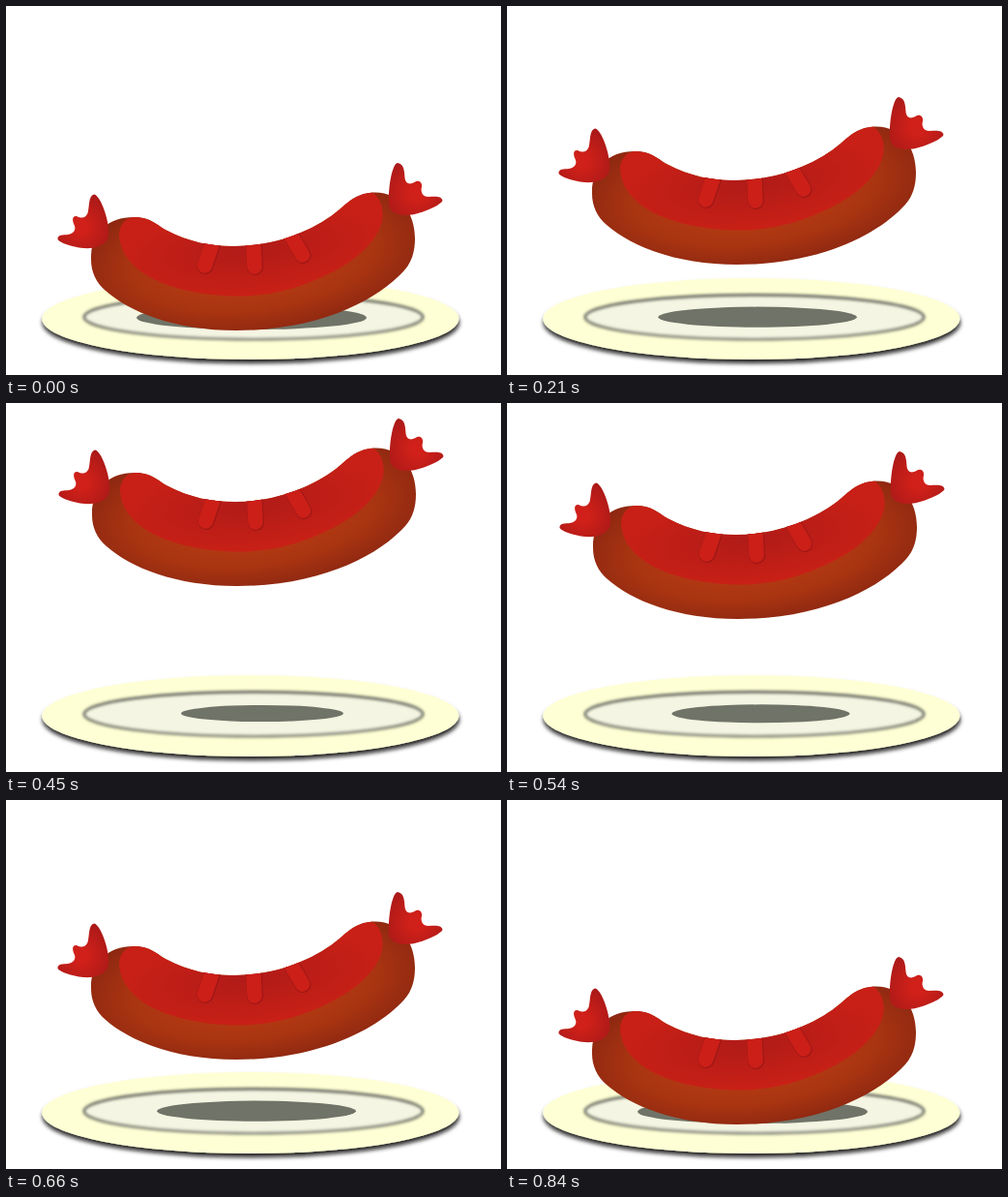
An HTML page that plays this animation: 512 by 381 pixels, repeating every 0.87 s.

```html
<!DOCTYPE html>
<html lang="en">
<head>
<meta charset="utf-8">
<title>Bouncing sausage</title>
<style>
  html, body { margin: 0; width: 100%; height: 100%; overflow: hidden; background: #fff; }
  svg { display: block; }
</style>
</head>
<body>
<svg width="512" height="381" viewBox="0 0 512 381">
  <defs>
    <radialGradient id="skin" gradientUnits="userSpaceOnUse" cx="0" cy="0" r="1"
      gradientTransform="translate(256 258) rotate(-7) scale(182 80)">
      <stop offset=".45" stop-color="#b23a12"/>
      <stop offset=".7" stop-color="#a93411"/>
      <stop offset="1" stop-color="#8e2811"/>
    </radialGradient>
    <radialGradient id="meat" gradientUnits="userSpaceOnUse" cx="0" cy="0" r="1"
      gradientTransform="translate(254 251) rotate(-7) scale(138 46)">
      <stop offset="0" stop-color="#b01b18"/>
      <stop offset="1" stop-color="#c82016"/>
    </radialGradient>
    <radialGradient id="tailL" gradientUnits="userSpaceOnUse" cx="77" cy="228" r="36">
      <stop offset=".2" stop-color="#d02019"/>
      <stop offset="1" stop-color="#a81918"/>
    </radialGradient>
    <radialGradient id="tailR" gradientUnits="userSpaceOnUse" cx="425" cy="193" r="38">
      <stop offset=".2" stop-color="#d02019"/>
      <stop offset="1" stop-color="#a81918"/>
    </radialGradient>
    <linearGradient id="rim" x2="0" y2="1">
      <stop stop-color="#55574b"/>
      <stop offset="1" stop-color="#808273"/>
    </linearGradient>
    <filter id="drop" x="-10%" y="-20%" width="120%" height="150%">
      <feDropShadow dx=".5" dy="4" stdDeviation="1.9" flood-color="#111" flood-opacity=".9"/>
    </filter>
    <filter id="soft" x="-5%" y="-20%" width="110%" height="140%">
      <feGaussianBlur stdDeviation="1.4"/>
    </filter>
    <path id="body" d="M88 262C87 236 104 218 132 218C150 218 156 226 165 231C190 244 212 248 236 248
      C280 248 320 231 345 210C354 202 364 192.5 382 192.5C408 192.5 423 214 423 240C423 253 420 264 412 273
      C385 303 325 335 238 335C175 335 128 316 103 294C93 286 88 274 88 262Z"/>
    <clipPath id="inside"><use href="#body"/></clipPath>
    <path id="marks" d="M215 242L206 268.5M256 240L257.5 269.5M292 232L307 257.5"/>
  </defs>

  <ellipse cx="252.8" cy="323" rx="215.5" ry="42" fill="#ffffd5" filter="url(#drop)"/>
  <ellipse cx="256" cy="321" rx="176" ry="24" fill="#f4f5e2"/>
  <ellipse cx="256" cy="321.2" rx="175.3" ry="23" fill="none" stroke="url(#rim)" stroke-width="2.6" filter="url(#soft)"/>
  <ellipse id="shadow" fill="#707367"/>

  <g id="sausage">
    <use href="#body" fill="url(#skin)"/>
    <g clip-path="url(#inside)">
      <path fill="url(#meat)" d="M132 218C150 218 156 226 165 231C190 244 212 248 236 248C280 248 320 231 345 210
        C354 202 364 192.5 379 192.5C388 199 391 210 389 222C384 243 362 263 335 276C305 291 275 299.5 240 299.5
        C200 299.5 160 290 138 273C122 260 117 247 117 235C118 226 123 219 132 218Z"/>
      <g fill="none" stroke-linecap="round">
        <use href="#marks" stroke="#9c1715" stroke-width="17"/>
        <use href="#marks" stroke="#cb1f18" stroke-width="15.6" transform="translate(-.4 -.4)"/>
      </g>
    </g>
    <path fill="url(#tailL)" d="M91 194.5C97 194.5 108 222 106 238C104 247 92 251 80 250C68 249 55 244 53.5 241
      C53 236 59 236.5 64 236C70 235 73 231 70.5 226C68 220 69 216.5 73 217C78 219.5 82 219.5 84.5 214
      C86.5 207 85 196 91 194.5Z"/>
    <path fill="url(#tailR)" d="M405 162C399 163 395 190 396 205C397 215 408 217 420 215.5C434 213 450 205 451.5 201
      C451 196 444 196.5 437 197C431 197 428.5 192 430 187C431 182 426.5 179 422.5 182C417 185 413 183 412.5 177
      C412 171 412 163 405 162Z"/>
  </g>
</svg>
<script>
  const STEP = 30, STEPS = 29, PEAK = 15;
  const sausage = document.getElementById('sausage');
  const shadow = document.getElementById('shadow');

  function draw(now) {
    const step = Math.floor(now / STEP) % STEPS;
    const lift = step <= PEAK ? step / PEAK : (STEPS - 1 - step) / (STEPS - 1 - PEAK);
    sausage.setAttribute('transform', `translate(${Math.round(lift)} ${-Math.round(146 * lift)})`);
    const shape = { cx: 254 + 11 * lift, cy: 321.8 - 1.3 * lift, rx: 119 - 35 * lift, ry: 12.3 - 3.7 * lift };
    for (const name in shape) shadow.setAttribute(name, shape[name]);
  }

  const start = performance.now();
  function tick() {
    draw(performance.now() - start);
    requestAnimationFrame(tick);
  }
  tick();
</script>
</body>
</html>
```
